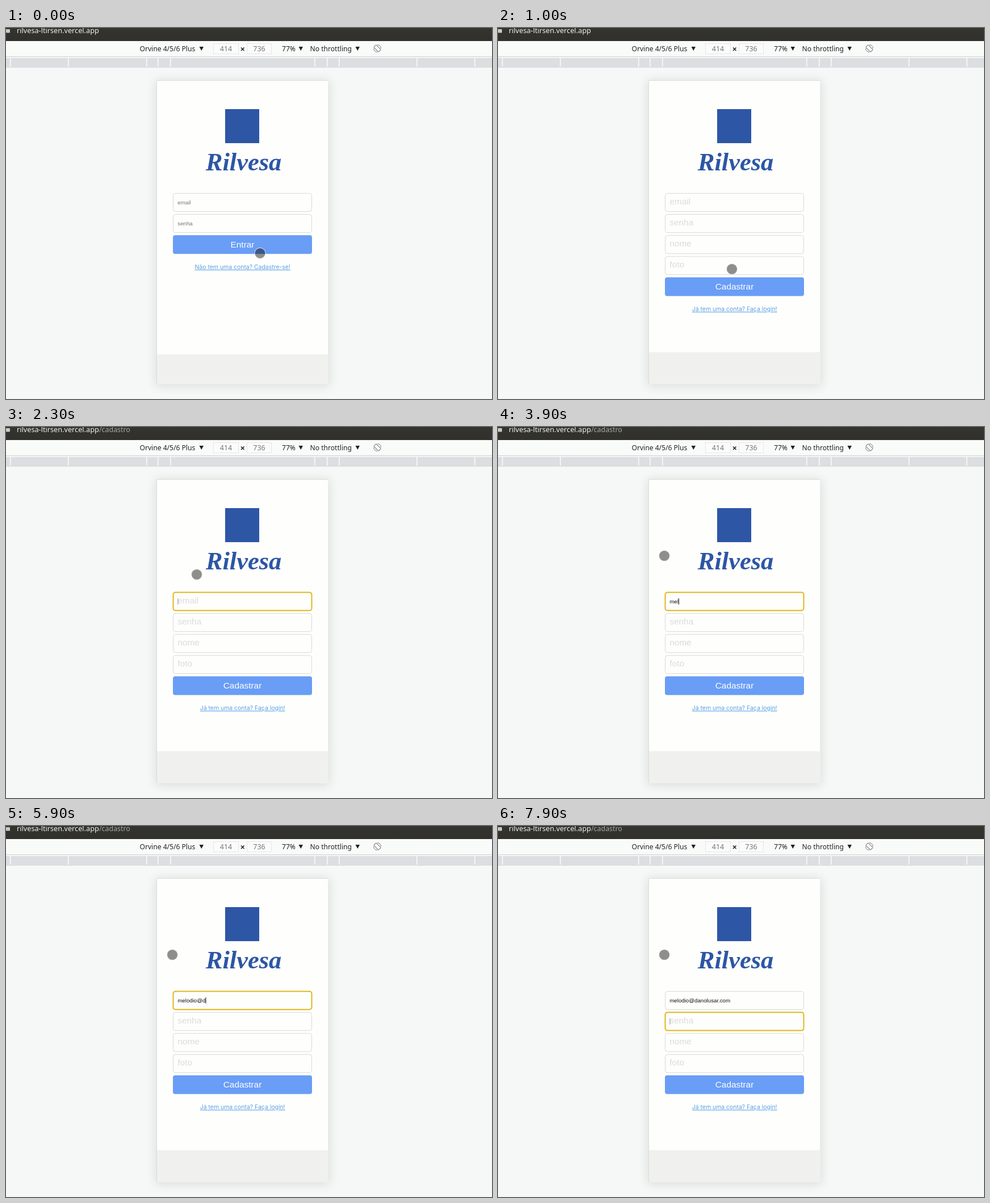
These frames come from a looping animation (856x654 px, 8000 ms). An HTML page:

```html
<!DOCTYPE html>
<html lang="pt">
<head>
<meta charset="utf-8">
<style>
  html, body { margin: 0; width: 100%; height: 100%; overflow: hidden; background: #f6f8f7; }
  svg { display: block; width: 856px; height: 654px; }
  text { font-family: 'Noto Sans', sans-serif; font-size: 12.1px; fill: #222; }
  .url { font-size: 12.7px; fill: #f0f0ee; }
  .path { font-size: 12.4px; fill: #a9a8a4; }
  .size { font-size: 12.4px; fill: #777; }
  .name { font: italic bold 44.5px 'Liberation Serif', serif; fill: #2d56a5; }
  .field text, .button text { font: 15.4px 'Liberation Sans', sans-serif; fill: #dbdbdb; }
  .field .small { font-size: 9.7px; fill: #757575; }
  .field .typed { fill: #111; }
  .field rect { fill: #fefefd; stroke: #d9dad8; }
  .field.focus rect { stroke: #e0b61a; stroke-width: 2; }
  .button rect { fill: #699df6; }
  .button text { fill: #fff; }
  .link { font: 10.45px Inter, sans-serif; fill: #5a9fe8; text-decoration: underline; }
  .mid { text-anchor: middle; }
</style>
</head>
<body>
<svg viewBox="0 0 856 654">
  <defs>
    <linearGradient id="bar" x2="0" y2="1">
      <stop stop-color="#35342f"/><stop offset="1" stop-color="#30302c"/>
    </linearGradient>
    <filter id="blur" x="-20%" y="-20%" width="140%" height="140%"><feGaussianBlur stdDeviation="9"/></filter>
  </defs>
  <rect width="856" height="654" fill="#f6f8f7"/>
  <rect width="856" height="23" fill="url(#bar)"/>
  <rect y="2" width="7" height="6.500" rx="1" fill="#c8c8c4"/>
  <text class="url" x="19" y="8.500">rilvesa-ltirsen.vercel.app</text>
  <text class="path" id="path" x="164" y="8.500">/cadastro</text>

  <rect y="23" width="856" height="27" fill="#f9fbf9"/>
  <rect y="50" width="856" height="1" fill="#cfd1d0"/>
  <rect y="53" width="856" height="17" fill="#dddee1"/>
  <g id="ticks" fill="#fbfcfc"></g>
  <text x="235.500" y="40.500">Orvine 4/5/6 Plus</text>
  <text x="486" y="40.500">77%</text>
  <text x="535.500" y="40.500">No throttling</text>
  <g fill="#fafbfa" stroke="#e6e7e6">
    <rect x="365.500" y="27.500" width="44" height="18"/>
    <rect x="424.500" y="27.500" width="43" height="18"/>
  </g>
  <text class="size mid" x="387.500" y="41">414</text>
  <text class="size mid" x="446" y="41">736</text>
  <path d="M414 34.500l5.500 5.500m0-5.500l-5.500 5.500" stroke="#222" stroke-width="1.600"/>
  <path d="M340.500 33h7.500l-3.750 7zM515.500 33h7.500l-3.750 7zM615.500 33h7.500l-3.750 7z" fill="#222"/>
  <g transform="translate(654 36)" fill="none" stroke="#777">
    <rect x="-3" y="-6" width="6" height="12" rx="1" transform="rotate(-45)"/>
    <path d="M0-6.500a6.500 6.500 0 0 1 6.500 6.500M0 6.500a6.500 6.500 0 0 1-6.500-6.500"/>
  </g>

  <rect x="263" y="92" width="307" height="540" fill="#000" opacity=".1" filter="url(#blur)"/>
  <rect x="265" y="92" width="303" height="536" rx="1" fill="#dcdddb"/>
  <rect x="266" y="93" width="301.500" height="535" fill="#fefffc"/>
  <rect id="footer" x="266" width="301.500" fill="#f0f1ee"/>
  <rect x="386" y="143" width="60" height="60" fill="#2d56a5"/>
  <text class="name mid" x="418.500" y="251">Rilvesa</text>

  <g id="login"></g>
  <g id="signup"></g>
  <rect id="caret" width="1" height="11"/>
  <circle id="pointer" r="9.500" fill="#000" fill-opacity=".44" stroke="#fff" stroke-opacity=".55" stroke-width="1.300"/>
</svg>
<script>
const $ = id => document.getElementById(id);
const rowTop = row => 291.5 + row * 37.1;

const field = (label, row, small) => `<g class="field">
  <rect x="294.500" y="${rowTop(row)}" width="244" height="32" rx="4"/>
  <text class="${small ? 'small' : ''}" x="302.300" y="${rowTop(row) + 19.5}">${label}</text></g>`;
const button = (label, row) => `<g class="button">
  <rect x="294" y="${rowTop(row) - .5}" width="245" height="33" rx="4"/>
  <text class="mid" x="416.500" y="${rowTop(row) + 21.2}">${label}</text></g>`;
const link = (label, row) =>
  `<text class="link mid" x="416.700" y="${rowTop(row) + 59.3}">${label}</text>`;

$('ticks').innerHTML = [7, 109, 247, 267, 289, 543, 565, 586, 723, 825]
  .map(x => `<rect x="${x}" y="53" width="1.500" height="15"/>`).join('');
$('login').innerHTML = field('email', 0, true) + field('senha', 1, true) +
  button('Entrar', 2) + link('Não tem uma conta? Cadastre-se!', 2);
$('signup').innerHTML = ['email', 'senha', 'nome', 'foto'].map((s, i) => field(s, i)).join('') +
  button('Cadastrar', 4) + link('Já tem uma conta? Faça login!', 4);

const fields = $('signup').querySelectorAll('.field');
const emailText = fields[0].querySelector('text');
const email = 'melodio@danolusar.com';
const keyTimes = [34, 35, 39, 44, 44, 45, 47, 55, 59, 61, 63, 65, 66, 68, 70, 71, 73, 74, 76, 77, 78];

// Pointer stops: tenth of a second, x, y
const stops = [
  [0, 447.5, 397], [2, 449, 399], [3, 438, 420], [4, 417, 434],
  [6, 416, 432], [7, 414, 429], [8, 412.5, 426], [9, 412, 425],
  [15, 402, 402], [16, 374, 352], [17, 350, 313], [18, 341.5, 298], [20, 341, 318],
  [22, 339, 290], [23, 336, 260], [25, 320, 227], [28, 293, 227]
];

function render(now) {
  const tick = Math.floor(now % 8000 / 100);
  const onSignup = tick >= 10;
  $('login').style.display = onSignup ? 'none' : '';
  $('signup').style.display = onSignup ? '' : 'none';
  $('path').style.display = tick >= 11 ? '' : 'none';
  const footerTop = onSignup ? 571.5 : 575.5;
  $('footer').setAttribute('y', footerTop);
  $('footer').setAttribute('height', 628 - footerTop);

  const typed = email.slice(0, keyTimes.filter(k => k <= tick).length);
  emailText.textContent = typed || 'email';
  emailText.setAttribute('class', typed ? 'small typed' : '');

  const focus = tick >= 79 ? 1 : tick >= 20 ? 0 : -1;
  fields.forEach((f, i) => f.classList.toggle('focus', i === focus));
  const writing = focus === 0 && typed;
  const caret = $('caret');
  caret.style.display = focus < 0 ? 'none' : '';
  caret.setAttribute('x', 302.3 + (writing ? emailText.getComputedTextLength() : 0));
  caret.setAttribute('y', rowTop(Math.max(focus, 0)) + 10.5);
  caret.setAttribute('fill', writing ? '#222' : '#999');

  const [, x, y] = stops.filter(s => s[0] <= tick).pop();
  $('pointer').setAttribute('transform', `translate(${x} ${y})`);
  $('pointer').style.display = tick >= 52 && tick < 55 ? 'none' : '';
}

const start = performance.now();
(function loop() {
  render(performance.now() - start);
  requestAnimationFrame(loop);
})();
</script>
</body>
</html>
```
